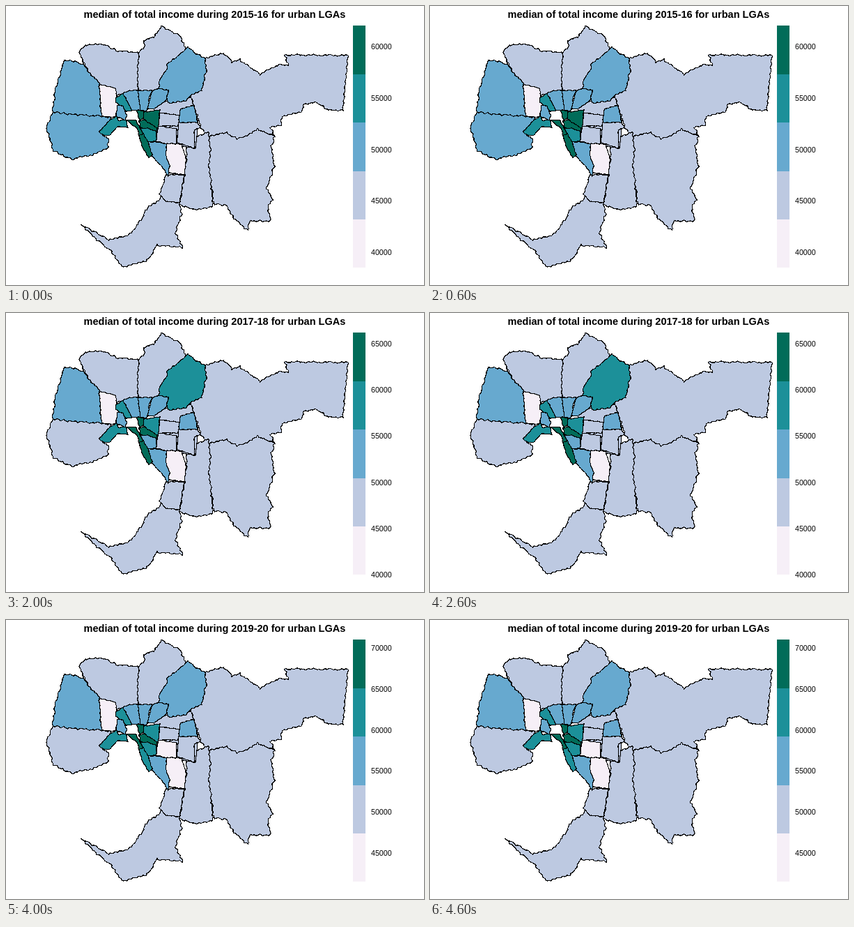
An HTML page for the animation above (5000 ms loop, 600 px wide and 400 px high).

```html
<!DOCTYPE html>
<html lang="en">
<head>
<meta charset="utf-8">
<title>Median income map</title>
<style>
  html, body { margin: 0; width: 100%; height: 100%; overflow: hidden; background: #fff; }
  svg { display: block; width: 600px; height: 400px; }
  text { font: 10.67px "Liberation Sans", Arial, sans-serif; }
  #title { font-size: 14.55px; font-weight: bold; text-anchor: middle; }
  #map { stroke: #000; stroke-width: 1.25; stroke-linejoin: round; shape-rendering: crispEdges; }
</style>
</head>
<body>
<svg viewBox="0 0 600 400">
  <text id="title" x="299.5" y="17"></text>
  <g id="map"></g>
  <g id="bar" shape-rendering="crispEdges"></g>
  <g id="labels"></g>
</svg>
<script>
const COLORS = ["#f6eff7", "#bdc9e1", "#67a9cf", "#1c9099", "#016c59"];
// Top label value, its y centre and the distance between labels, per year
const YEARS = [
  { top: 60000, y: 58, step: 73.75 },
  { top: 60000, y: 77.3, step: 70.5 },
  { top: 65000, y: 44, step: 66.2 },
  { top: 65000, y: 82, step: 61.3 },
  { top: 70000, y: 39.7, step: 58.9 }
];
const STEP_MS = 1000, BAR_TOP = 28.35, BAND = 69.4;
const byId = id => document.getElementById(id);

function add(parent, tag, attrs) {
  const node = document.createElementNS("http://www.w3.org/2000/svg", tag);
  for (const key in attrs) node.setAttribute(key, attrs[key]);
  return byId(parent).appendChild(node);
}

// A fixed ripple field roughens outlines; shared borders stay together.
function ripple(x, y, rough) {
  const dx = Math.sin(x * 0.5 + y * 0.7) + 0.6 * Math.sin(x * 1.9 + y * 2.7);
  const dy = Math.sin(x * 0.8 - y * 0.4) + 0.6 * Math.sin(x * 2.3 - y * 1.7);
  return (x + dx * rough).toFixed(1) + "," + (y + dy * rough).toFixed(1);
}

function outline(points, rough) {
  const corners = points.split(" ").map(p => p.split(",").map(Number));
  const path = [];
  corners.forEach(([x, y], i) => {
    const [nx, ny] = corners[(i + 1) % corners.length];
    const parts = Math.ceil(Math.hypot(nx - x, ny - y) / 2.5);
    for (let k = 0; k < parts; k++)
      path.push(ripple(x + (nx - x) * k / parts, y + (ny - y) * k / parts, rough));
  });
  return "M" + path.join("L") + "Z";
}

// levels: one colour index per year, or a single one for all years.
// Later areas cover the hidden edges of earlier ones.
const areas = [];
function area(levels, points, rough) {
  areas.push({ levels, node: add("map", "path", { d: outline(points, rough) }) });
}
const outer = (levels, points) => area(levels, points, 0.9);
const inner = (levels, points) => area(levels, points, 0.4);

// West and north
outer("22111", "67,152 90,155 137,158 152,160 140,185 147,190 146,203 125,213 105,217 95,220 68,208 62,188 58,175");
outer("2", "67,152 70,122 78,97 83,78 97,79 111,84 134,112 137,158 90,155");
outer("1", "113,56 140,55 158,64 190,67 189,122 160,127 134,112 120,95 111,80 105,64");
outer("1", "189,121 190,67 199,57 197,50 213,45 223,29 250,43 258,62 240,100 233,121 200,123");

// East and south
outer("1", "285,75 312,68 325,80 335,77 365,98 378,90 393,84 406,85 400,70 491,71 484,150 463,149 445,138 428,141 424,151 396,158 394,170 380,174 386,187 360,176 345,187 330,190 315,181 290,187 280,175 266,131");
outer("1", "109,314 124,322 147,335 177,329 194,306 204,287 218,281 225,268 249,280 250,290 252,300 243,324 254,346 217,343 202,366 168,374 148,349 127,332");
outer("1", "258,195 290,180 294,205 291,228 294,250 297,286 283,291 268,291 249,285 256,242 259,219");
outer("1", "291,187 315,181 330,190 345,187 360,176 386,187 381,201 385,230 374,262 383,277 376,288 380,309 350,308 347,322 327,304 317,286 298,284 294,250 291,228 294,205");
inner("12111", "229,242 256,242 249,282 230,280 220,270 226,255");

// Middle suburbs
inner("1", "212,148 220,138 266,131 276,168 272,204 231,198 217,176 220,160");
outer("23322", "219,118 220,105 231,92 231,83 247,73 260,58 272,68 285,74 287,92 281,122 266,128 259,135 235,139 230,134");
inner("1", "221,153 250,157 248,172 218,172");
inner("11100", "218,172 245,176 245,197 231,198 216,194");
inner("2", "250,148 270,142 275,167 248,167");
inner("1", "248,167 275,167 279,174 270,178 271,204 252,198 245,195");
inner("0", "231,197 252,198 259,220 256,242 233,239 235,228 229,214");
inner("2", "204,195 217,195 231,198 229,214 235,228 233,244 225,232 209,214");
inner("0", "134,112 157,118 165,160 137,158");

// City ring
inner("2", "189,121 210,121 204,135 212,142 200,151 193,149");
inner("2", "210,121 219,118 233,121 230,135 212,148 203,147");
inner("2", "168,125 178,121 189,121 193,149 181,150");
inner("3", "158,138 157,132 168,125 181,150 173,151");
inner("2", "160,142 168,143 173,156 172,164 158,158");
inner("3", "134,180 149,163 159,158 161,164 172,163 175,174 160,173 148,186 136,184");
inner("4", "188,149 198,151 201,160 191,164");
inner("43333", "198,152 221,149 218,177 197,162");
inner("4", "191,165 198,163 217,175 216,180 194,175");
inner("33223", "193,176 203,175 216,180 216,194 204,195 197,184");
inner("44443", "191,186 197,183 204,195 210,214 205,217 196,203");
inner("4", "173,164 186,163 197,183 191,186 189,176");

COLORS.forEach((fill, i) => add("bar", "rect", {
  x: 498, y: BAR_TOP + (COLORS.length - 1 - i) * BAND, width: 18, height: BAND, fill
}));

function show(index) {
  const { top, y, step } = YEARS[index];
  byId("title").textContent =
    `median of total income during ${2015 + index}-${16 + index} for urban LGAs`;
  for (const { levels, node } of areas)
    node.setAttribute("fill", COLORS[levels[index % levels.length]]);
  byId("labels").replaceChildren();
  for (let i = 0; y + i * step < BAR_TOP + COLORS.length * BAND; i++)
    add("labels", "text", { x: 524, y: y + i * step + 4 }).textContent = top - i * 5000;
}

let shown = -1;
function tick() {
  const index = Math.floor(performance.now() / STEP_MS) % YEARS.length;
  if (index !== shown) show(shown = index);
  requestAnimationFrame(tick);
}
tick();
</script>
</body>
</html>
```
